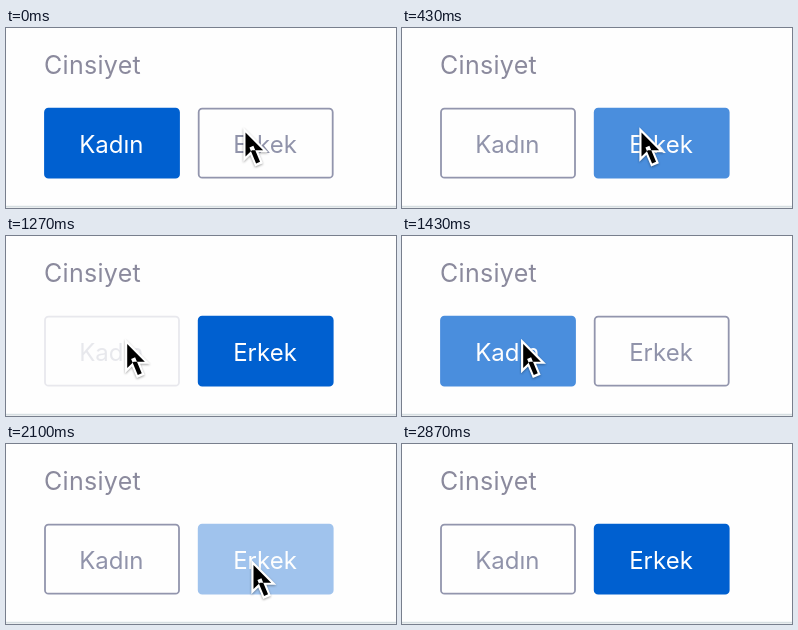
These frames come from a looping animation (390 by 180 pixels, 2910 ms). An HTML page:

```html
<!DOCTYPE html>
<html lang="tr">
<head>
<meta charset="utf-8">
<title>Cinsiyet</title>
<style>
  html, body { margin: 0; width: 100%; height: 100%; overflow: hidden; background: #fefefe; }
  svg { display: block; width: 390px; height: 180px; }
  text { font-family: Inter, "Liberation Sans", sans-serif; }
  .title { font-size: 25px; letter-spacing: .3px; fill: #8b8a9d; }
  .button rect { fill: #fefefe; stroke: #9295ad; stroke-width: 1.8; }
  .button text { font-size: 24px; fill: #9093aa; text-anchor: middle; }
  .button.on rect { fill: #0060d0; stroke: #0060d0; }
  .button.on text { fill: #fff; }
  #cursor { filter: drop-shadow(0 1.5px 1.2px rgba(0, 0, 0, .35)); }
</style>
</head>
<body>
<svg viewBox="0 0 390 180">
  <rect width="390" height="180" fill="#fefefe"/>
  <text class="title" x="38" y="46">Cinsiyet</text>
  <g class="button" id="female">
    <rect x="39" y="80.7" width="134" height="69" rx="3.5"/>
    <text x="105.3" y="125">Kadın</text>
  </g>
  <g class="button" id="male">
    <rect x="192.7" y="80.7" width="134" height="69" rx="3.5"/>
    <text x="259" y="125">Erkek</text>
  </g>
  <path d="M0 178.6H390" stroke="#d6dee1" stroke-width="1.6"/>
  <g id="cursor">
    <g transform="scale(2.15) translate(-9.2 -7.3)">
      <path fill="#fff" d="M8.2 20.9V4.9L19.8 16.5H13L12.6 16.6ZM17.3 21.6L13.7 23.1 9 12 12.7 10.5Z"/>
      <path d="M9.2 7.3V18.5L12.2 15.6 12.6 15.5H17.4ZM11.03 14.29L12.87 13.52 15.97 20.9 14.13 21.67Z"/>
    </g>
  </g>
</svg>
<script>
  const LOOP = 2910, DIM = 0.2, FADE = 250;
  const $ = id => document.getElementById(id);
  const female = $('female'), male = $('male'), cursor = $('cursor');

  // press: dims at once; release: starts the fade back; flip: selection changes
  const taps = [
    { button: male, press: 230, release: 288, flip: 290 },
    { button: female, press: 1270, release: 1288, flip: 1328 },
    { button: male, press: 1960, release: 2021, flip: 2021 }
  ];

  // Cursor stops: time, x, y of the tip
  const stops = [
    [0, 239.5, 104.5], [590, 239.5, 104.5],
    [1070, 121.2, 108], [1460, 121.2, 108],
    [1710, 245.4, 120.5], [1800, 246.5, 121], [1900, 247.5, 121],
    [2320, 247.5, 121], [2830, 394, 25]
  ];

  const clamp = v => Math.min(1, Math.max(0, v));
  const ease = p => p < 0.5 ? 2 * p * p : 1 - 2 * (1 - p) ** 2;

  function tip(t) {
    const next = stops.findIndex(s => s[0] > t);
    if (next < 0) return stops[stops.length - 1].slice(1);
    const [t0, x0, y0] = stops[next - 1], [t1, x1, y1] = stops[next];
    const p = ease((t - t0) / (t1 - t0));
    return [x0 + (x1 - x0) * p, y0 + (y1 - y0) * p];
  }

  function draw(t) {
    let selected = female;
    const alpha = new Map([[female, 1], [male, 1]]);
    for (const { button, press, release, flip } of taps) {
      if (t >= flip) selected = button;
      if (t >= press) alpha.set(button, DIM + (1 - DIM) * ease(clamp((t - release) / FADE)));
    }
    for (const [button, a] of alpha) {
      button.classList.toggle('on', button === selected);
      button.setAttribute('opacity', a);
    }
    cursor.setAttribute('transform', `translate(${tip(t)})`);
    cursor.setAttribute('visibility', t < 2830 ? 'visible' : 'hidden');
  }

  const start = performance.now();
  function tick() {
    draw((performance.now() - start) % LOOP);
    requestAnimationFrame(tick);
  }
  tick();
</script>
</body>
</html>
```
